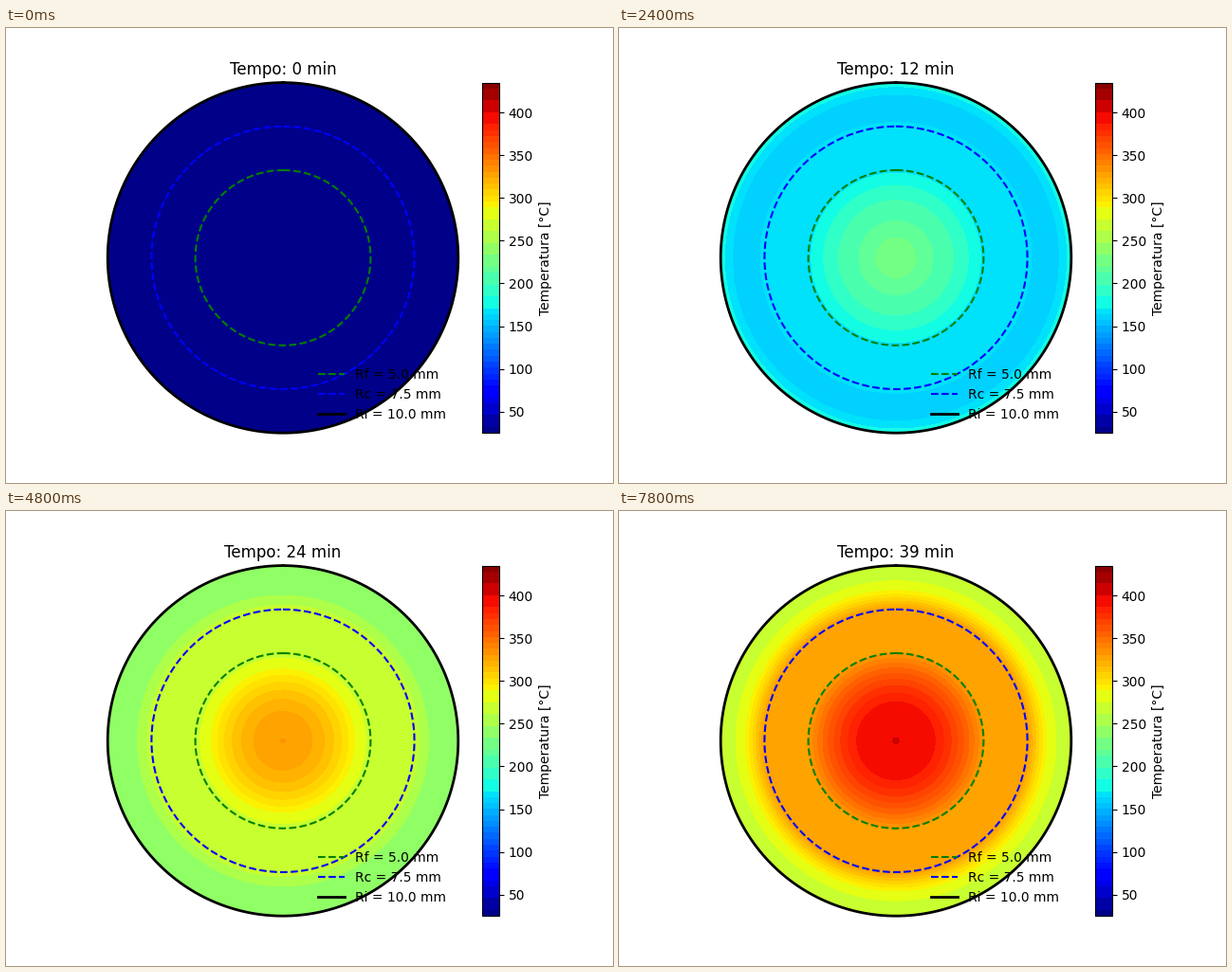
These frames come from a looping animation (640x480 px, 8 s). A matplotlib script:

```python
import numpy as np
import matplotlib.pyplot as plt
from matplotlib.animation import FuncAnimation
from matplotlib.cm import ScalarMappable
from matplotlib.colors import BoundaryNorm, ListedColormap

MINUTES = 40
STEP_MS = 200
R_FUEL, R_CLAD, R_INS = 5.0, 7.5, 10.0
T_AMB, T_MAX = 25.0, 435.0

# Even temperature steps, thinned to every second one in green and at the ends
skip = [*range(2, 6, 2), *range(22, 28, 2), *range(29, 39, 2), *range(53, 59, 2)]
levels = np.delete(np.linspace(T_AMB, T_MAX, 60), skip)
mids = (levels[:-1] + levels[1:]) / 2
cmap = ListedColormap(plt.get_cmap("jet")((mids - T_AMB) / (T_MAX - T_AMB)))
norm = BoundaryNorm(levels, cmap.N)

theta = np.linspace(0, 2 * np.pi, 241)
radius = np.linspace(0, R_INS, 241)


def rise(t, tau):
    """Approach from 0 to 1 with time constant tau."""
    return 1 - np.exp(-t / tau)


def profile(t):
    """Temperature along the radius after t minutes."""
    center = T_AMB + 437.6 * rise(t, 20)
    surface = T_AMB + 250 * rise(t, 13)
    drop = (50 + 0.52 * t) * rise(t, 3)
    sag = 12 * rise(t, 2)
    clad = center - drop

    fuel = center - drop * (radius / R_FUEL) ** 2
    u = (radius - R_CLAD) / (R_INS - R_CLAD)
    shell = clad + (surface - clad) * u - 4 * sag * u * (1 - u)
    temp = np.where(radius < R_FUEL, fuel, np.where(radius < R_CLAD, clad, shell))
    return np.clip(temp, T_AMB + 0.5, T_MAX - 0.5)


fig, ax = plt.subplots(figsize=(6.4, 4.8), dpi=100,
                       subplot_kw={"projection": "polar"})
ax.set_theta_zero_location("N")
ax.set_theta_direction(-1)

bar = fig.colorbar(ScalarMappable(norm, cmap), ax=ax, spacing="proportional",
                   ticks=range(50, 401, 50), label="Temperatura [°C]")
bar.minorticks_off()

for name, r, color, style, width in (("Rf", R_FUEL, "green", "--", 1.5),
                                     ("Rc", R_CLAD, "blue", "--", 1.5),
                                     ("Ri", R_INS, "black", "-", 2)):
    ax.plot(theta, np.full_like(theta, r), color=color, linestyle=style,
            linewidth=width, clip_on=False, label=f"{name} = {r:.1f} mm")

ax.set_xticks([])
ax.set_yticks([])
ax.grid(False)
ax.legend(loc="lower right", frameon=False)
title = ax.set_title("")
fields = []


def update(minute):
    while fields:
        fields.pop().remove()
    temp = np.repeat(profile(minute)[:, None], theta.size, axis=1)
    fields.append(ax.contourf(theta, radius, temp, levels=levels,
                              cmap=cmap, norm=norm))
    ax.set_ylim(0, R_INS)
    title.set_text(f"Tempo: {minute} min")
    return []


anim = FuncAnimation(fig, update, frames=MINUTES, interval=STEP_MS,
                     init_func=lambda: update(0), repeat=True)
plt.show()
```
